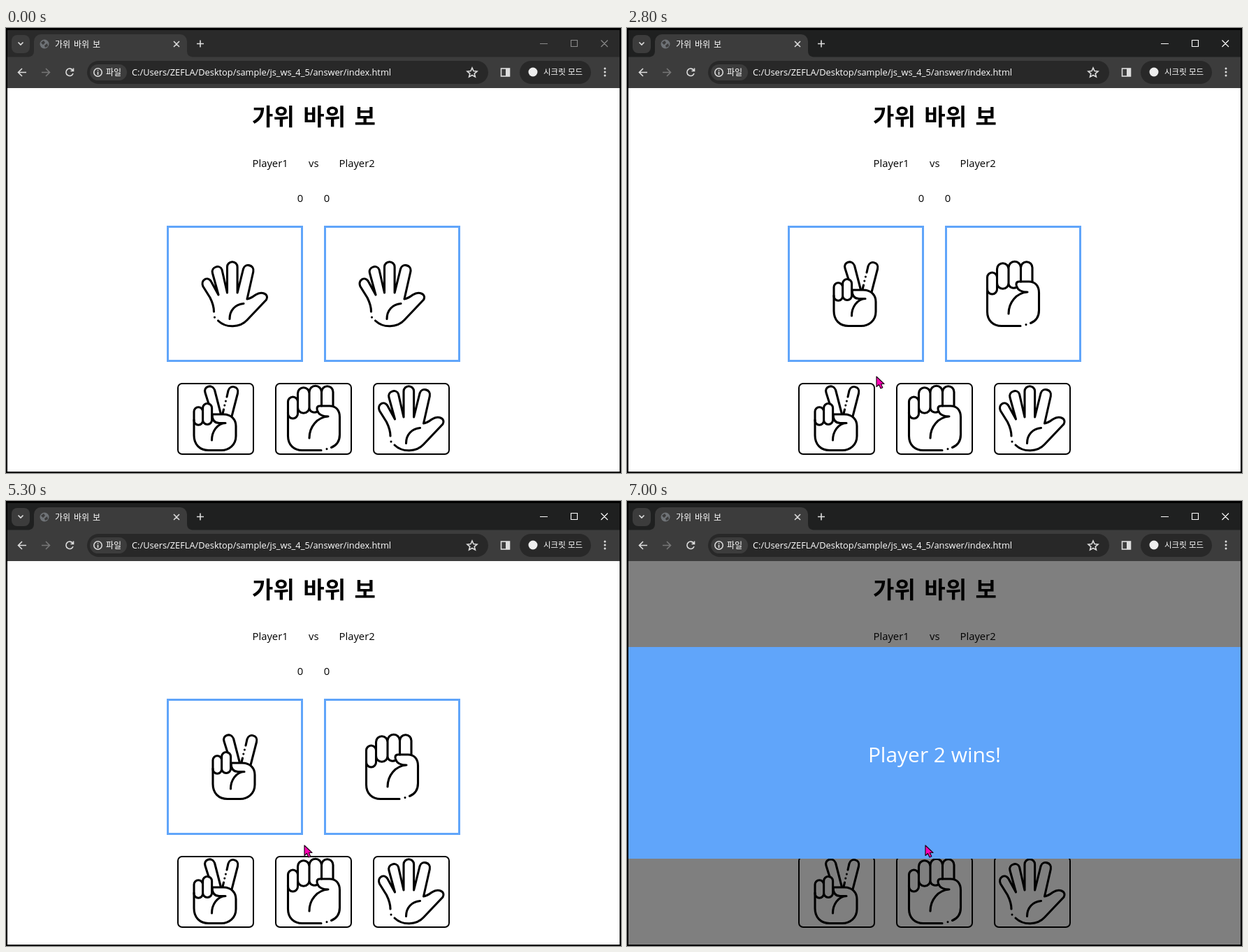
These frames come from a looping animation (880x637 px, 8 s). An HTML page:

```html
<!DOCTYPE html>
<html lang="ko">
<head>
<meta charset="utf-8">
<title>가위 바위 보</title>
<style>
  html, body { margin: 0; width: 100%; height: 100%; overflow: hidden; background: #000; }
  svg { display: block; }
  text { font-family: "Open Sans", "Noto Sans", sans-serif; white-space: pre; }
  .ko { font-family: "Noto Sans CJK KR", "Noto Sans CJK", sans-serif; }
  .chrome { fill: #fff; font-size: 12px; }
  .icon { fill: none; stroke: #ddd; stroke-width: 1.6; }
  .hand { fill: none; stroke: #000; stroke-width: 3.1; stroke-linecap: round; stroke-linejoin: round; }
  .frame { fill: #fff; stroke: #60a5fa; stroke-width: 3; }
  .button { stroke: #000; stroke-width: 2; }
  .cursor { fill: #ff00b4; stroke: #200018; stroke-width: 1.2; stroke-linejoin: round; }
  .body { font-size: 14.8px; }
</style>
</head>
<body>
<svg width="880" height="637" viewBox="0 0 880 637">
  <defs>
    <g id="scissors" class="hand">
      <path d="M322 375H338C350 375 356 383 356 392V406C356 419 346 426.5 335 426.5H317C304 426.5 296 418 296 405V383"/>
      <path d="M296 384V371a6.3 6.3 0 0 1 12.6 0V384a6.3 6.3 0 0 1-12.6 0M308.6 370V366a6.5 6.5 0 0 1 13 0V383a6.5 6.5 0 0 1-13 0"/>
      <path d="M322 375C322 384 326 387.5 332 387.5H341C329 388 321.5 400 321.5 412"/>
      <path d="M317 360L312 344C309 335 322 331 325.5 340L334 373M343 350L345 341C348 332 361 335 358.5 345L350 378M341.4 356v.1M339.8 362v.1M338.5 368L337 374"/>
    </g>
    <g id="rock" class="hand">
      <path d="M403.5 550V584C403.5 597 412 604.5 424 604.5H451M459 602.5v.1M465.5 600.5C474 597 477.5 590 477.5 582V557C477.5 547 472 541 463 541H449C444 541 444.5 546 446 549C448 554 454 556 461 556C445 557 434 571 434 587"/>
      <path d="M403.5 552V535a7 7 0 0 1 14 0V552a7 7 0 0 1-14 0M417.5 535V523a8.2 8.2 0 0 1 16.5 0V543a8.2 8.2 0 0 1-16.5 0M434 523V521a8.7 8.7 0 0 1 17.5 0V541M434 543C434 549 440 552 446 549M451.5 521a8.2 8.2 0 0 1 16.5 0V541"/>
    </g>
    <g id="paper" class="hand">
      <path d="M297.5 406C297.5 398 295 392 292 386L282 370C278 361 288 355 293 362L304 382L295.5 351C293 342 306 338 309 346L316.5 379V342a7.3 7.3 0 0 1 14.6 0V379L339.5 345C342 336 356 339 353.8 349L345 388C350 387 353 385 357 382C366 376 377 381 372.5 389L345 418C335 429 315 430 303.5 419M298.5 414v.1M320 416.500C320 404 328 395.500 340 394.500"/>
    </g>
    <path id="arrow" class="cursor" d="M0 0V14.500L3.500 11.500L6 17L8.800 15.700L6.400 10.500H11z"/>
    <path id="pointer" class="cursor" d="M-2.500 1.500a1.700 1.700 0 0 1 3.400 0V6L6.500 7.500C8.500 8 9 9 9 10.500C9 14 7.500 14.500 7.500 18H-.500C-.500 16-4.500 13-6.500 9C-6.500 7-4.500 7-2.500 9z"/>
  </defs>

  <rect width="880" height="637"/>
  <rect id="strip" x="2" y="3" width="876" height="39"/>
  <g fill="#3c3c3c">
    <path d="M2 41.500H30C37 41.500 40 39 40 32V19a10 10 0 0 1 10-10H249a10 10 0 0 1 10 10V32C259 39 262 41.500 269 41.500H878V86H2z"/>
    <rect x="8" y="10" width="26" height="26" rx="8"/>
  </g>
  <g fill="#282828">
    <rect x="116" y="47" width="574" height="33" rx="16.500"/>
    <rect x="735" y="47" width="102" height="33" rx="16.500"/>
  </g>
  <rect x="120" y="52" width="53" height="23" rx="11.500" fill="#3c3c3c"/>
  <circle cx="55" cy="23" r="6.500" fill="#6f7377"/>
  <path d="M50 21l4-3 2 3-3 3zM55 25l4-3 1 4-4 2z" fill="#3c3c3c"/>
  <circle cx="754" cy="63" r="6.500" fill="#eee"/>
  <g class="icon">
    <path d="M17.500 20.500L21 24L24.500 20.500M240 19l8 8M248 19l-8 8M273 22.500h10M278 17.500v10"/>
    <path d="M29 63.500H18M23 58L17.500 63.500L23 69"/>
    <path d="M51 63.500H62M57 58L62.500 63.500L57 69" stroke="#777"/>
    <path d="M95.500 60.500A5.200 5.200 0 1 0 96 65M96.500 57.500V61.500H92.500"/>
    <circle cx="131.500" cy="63.500" r="5.700"/>
    <path d="M131.500 62.500V67M131.500 60V61.300"/>
    <path d="M667 57L669 61.500L674 62L670.200 65.300L671.400 70L667 67.500L662.600 70L663.800 65.300L660 62L665 61.500z"/>
    <rect x="708.500" y="58" width="12" height="11"/>
  </g>
  <g fill="#ddd">
    <rect x="715" y="58" width="6" height="11"/>
    <circle cx="857" cy="58" r="1.500"/><circle cx="857" cy="63" r="1.500"/><circle cx="857" cy="68" r="1.500"/>
  </g>
  <path id="controls" d="M764 22.500H775M808.500 17.500h9v9h-9zM851.500 17.500l9.500 9.500M861 17.500l-9.500 9.500" fill="none" stroke-width="1.100"/>
  <g class="chrome">
    <text class="ko" x="70" y="27.500" style="word-spacing:1.500px">가위 바위 보</text>
    <text class="ko" x="143" y="67.500">파일</text>
    <text class="ko" x="769" y="67" font-size="11.500">시크릿 모드</text>
    <text x="180" y="68" font-size="12.800">C:/Users/ZEFLA/Desktop/sample/js_ws_4_5/answer/index.html</text>
  </g>

  <rect x="2" y="86" width="876" height="549" fill="#fff"/>
  <text class="ko" x="440.500" y="139" text-anchor="middle" font-size="33" font-weight="700" style="word-spacing:3.300px">가위 바위 보</text>
  <g class="body">
    <text x="352.500" y="199">Player1</text>
    <text x="433" y="199">vs</text>
    <text x="476.500" y="199">Player2</text>
    <text x="421" y="249" text-anchor="middle">0</text>
    <text id="score" x="459" y="249" text-anchor="middle">0</text>
  </g>
  <rect class="frame" x="231.500" y="284.500" width="192" height="192"/>
  <rect class="frame" x="456.500" y="284.500" width="192" height="192"/>
  <use id="hand1"/>
  <use id="hand2"/>
  <g id="buttons">
    <rect class="button" x="246" y="509" width="108" height="101" rx="6"/>
    <rect class="button" x="386" y="509" width="108" height="101" rx="6"/>
    <rect class="button" x="526" y="509" width="108" height="101" rx="6"/>
  </g>
  <use href="#scissors" x="-27" y="178"/>
  <use href="#rock"/>
  <use href="#paper" x="252.500" y="178"/>

  <rect id="dim" x="2" y="86" width="876" height="549" fill-opacity=".5"/>
  <g id="modal">
    <rect x="2" y="209" width="876" height="303" fill="#60a5fa"/>
    <text x="440" y="374" text-anchor="middle" font-size="29.900" fill="#fff">Player 2 wins!</text>
  </g>
  <use id="cursor"/>
</svg>
<script>
const LOOP = 8000, STEP = 100;
const CLICK = 2600, RESULT = 5400, MODAL = 5500;
const $ = id => document.getElementById(id);
const buttons = [...$('buttons').children];

// Symbol name and its offset inside the first player's frame
const hands = [['scissors', 0, 0], ['rock', -113, -178], ['paper', 0, 0]];

// Cursor path: time, x, y
const path = [
  [100, 808, 284], [200, 714, 349], [300, 622, 394], [400, 571, 417],
  [600, 556, 438], [700, 512, 488], [800, 462, 537], [900, 440, 557],
  [1700, 420, 561], [1800, 370, 565], [1900, 336, 565], [2000, 324, 561],
  [2800, 357, 499], [2900, 391, 497], [3000, 427, 493]
];

function setUse(el, name, x, y) {
  el.setAttribute('href', '#' + name);
  el.setAttribute('x', x);
  el.setAttribute('y', y);
}

function showHand(el, index, dx) {
  const [name, x, y] = hands[index];
  setUse(el, name, x + dx, y);
}

function show(el, on) {
  el.setAttribute('visibility', on ? 'visible' : 'hidden');
}

// The second hand cycles a little faster than the picture refreshes
function secondHand(t) {
  if (t < CLICK) return 2;
  const n = Math.floor((Math.min(t, 5300) - 3300) / STEP * 1.1 + 0.5);
  return ((n % 3) + 3) % 3;
}

function drawCursor(t) {
  const spot = path.filter(p => p[0] <= t).pop();
  show($('cursor'), spot);
  const [, x, y] = spot || [0, 0, 0];
  const over = buttons.findIndex((b, i) => {
    const left = 245 + 140 * i;
    return x > left && x < left + 110 && y > 508 && y < 611;
  });
  buttons.forEach((b, i) => b.setAttribute('fill', i === over ? '#d1d5db' : '#fff'));
  setUse($('cursor'), over < 0 ? 'arrow' : 'pointer', x, y);
}

function draw(now) {
  const t = Math.floor(now % LOOP / STEP) * STEP;
  const focused = t >= CLICK;
  $('strip').setAttribute('fill', focused ? '#1f2020' : '#2a2a2a');
  $('controls').setAttribute('stroke', focused ? '#fff' : '#8a8a8a');
  showHand($('hand1'), t < CLICK ? 2 : 0, 0);
  showHand($('hand2'), secondHand(t), 225);
  $('score').textContent = t < RESULT ? 0 : 1;
  show($('dim'), t >= RESULT);
  show($('modal'), t >= MODAL);
  drawCursor(t);
}

const start = performance.now();
function tick() {
  draw(performance.now() - start);
  requestAnimationFrame(tick);
}
tick();
</script>
</body>
</html>
```
